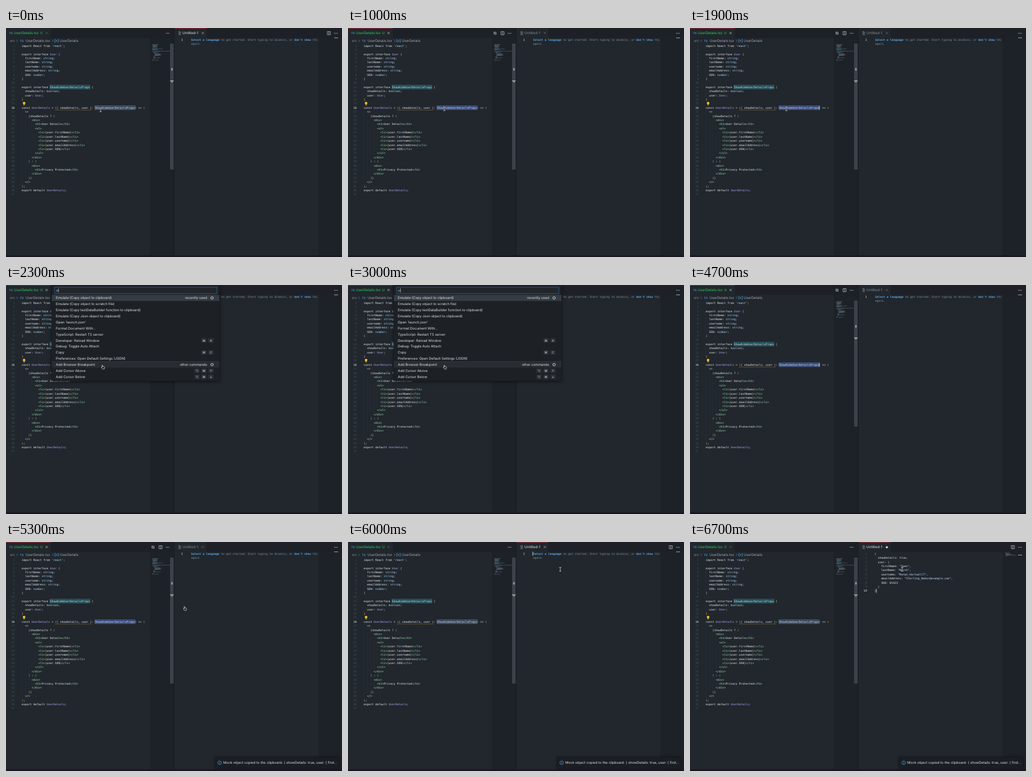
Recreate the animation shown at these times as an HTML page. Size 600 px wide and 411 px high, loop 6.8 s.

```html
<!DOCTYPE html>
<html lang="en">
<head>
<meta charset="utf-8">
<title>Editor</title>
<style>
  html, body { margin: 0; width: 100%; height: 100%; overflow: hidden; background: #21272d; }
  svg { display: block; width: 600px; height: 411px; }
  text { white-space: pre; text-rendering: geometricPrecision; }
  .code { font: 4.94px "DejaVu Sans Mono", monospace; }
  .ui { font: 6.1px Inter, "DejaVu Sans", sans-serif; }
  .num { text-anchor: end; }
</style>
</head>
<body>
<svg id="stage" viewBox="0 0 600 411"></svg>
<script>
const LOOP = 6800;
const CW = 2.974, LH = 7.41;
const FOCUS_LEFT = 450, OPEN = 2000, CLOSE = 4700, TOAST = 4800, FOCUS_RIGHT = 5800, PASTE = 6500;
const C = {
  bg: '#21272d', dark: '#1d2127', strip: '#1d2228', text: '#e4e9ee', dim: '#8b929a',
  num: '#49515a', name: '#b8a4f2', type: '#a6d4f7', tag: '#a5ecbd', brace: '#e6c27a',
  str: '#c5dcf2', green: '#35cf5f', blue: '#4aa5e8', red: '#a02c36'
};
const stage = document.getElementById('stage');

function el(parent, tag, attrs = {}, text) {
  const e = document.createElementNS('http://www.w3.org/2000/svg', tag);
  for (const k in attrs) e.setAttribute(k, attrs[k]);
  if (text !== undefined) e.textContent = text;
  parent.appendChild(e);
  return e;
}
const group = (parent = stage) => el(parent, 'g');
const rect = (p, x, y, width, height, fill, more) => el(p, 'rect', { x, y, width, height, fill, ...more });
const line = (p, d, stroke, w = 0.7, more) => el(p, 'path', { d, stroke, 'stroke-width': w, fill: 'none', ...more });
// y is the middle of the row
const ui = (p, x, y, s, fill, more) => el(p, 'text', { class: 'ui', x, y: y + 2.2, fill, ...more }, s);
const show = (e, on) => { e.style.display = on ? '' : 'none'; };

// ---- code text ----
const TOKEN = /('[^']*'|"[^"]*")|(<\/?\w+>)|\b(string|number|boolean)\b|\b(UserDetails|User)\b(?! Details)|([{}()]+)|([^'"<{}()\w]+|\w+|.)/g;
const TONES = [C.str, C.tag, C.type, C.name, C.brace, C.text];

function codeLine(p, x, y, s) {
  const t = el(p, 'text', { class: 'code', x, y: y + 1.7 });
  for (const m of s.matchAll(TOKEN)) {
    const kind = m.slice(1).findIndex(v => v !== undefined);
    el(t, 'tspan', { fill: TONES[kind] }, m[0]);
  }
}

function lineNumbers(p, x, y, count, current) {
  for (let i = 1; i <= count; i++)
    el(p, 'text', { class: 'code num', x, y: y + (i - 1) * LH + 1.7, fill: i === current ? '#f4f6f8' : C.num,
      'font-weight': i === current ? 'bold' : 'normal' }, i);
}

function miniMap(p, lines, x, y) {
  lines.forEach((s, i) => {
    const pad = s.search(/\S/);
    if (pad >= 0) rect(p, x + pad * 0.44, y + i * 0.82, (s.length - pad) * 0.44, 0.45, '#8d99a5', { opacity: 0.75 });
  });
}

const source = `import React from 'react';

export interface User {
  firstName: string;
  lastName: string;
  username: string;
  emailAddress: string;
  SEN: number;
}

export interface ShowHideUserDetailsProps {
  showDetails: boolean;
  user: User;
}

const UserDetails = ({ showDetails, user }: ShowHideUserDetailsProps) => (
  <>
    {showDetails ? (
      <div>
        <h1>User Details</h1>
        <ul>
          <li>{user.firstName}</li>
          <li>{user.lastName}</li>
          <li>{user.username}</li>
          <li>{user.emailAddress}</li>
          <li>{user.SEN}</li>
        </ul>
      </div>
    ) : (
      <div>
        <h1>Privacy Protected</h1>
      </div>
    )}
  </>
);
export default UserDetails;
`.split('\n');

const pasted = `{
  showDetails: true,
  user: {
    firstName: "Owen",
    lastName: "Marsh",
    username: "Ronan_Hartwell7",
    emailAddress: "Sterling_Nabor@example.com",
    SEN: 65423
  }
}`.split('\n');

// ---- icons ----
function cross(p, x, y, color) {
  line(p, `M${x - 1.9} ${y - 1.9}l3.8 3.8m0 -3.8l-3.8 3.8`, color);
}
function dots(p, x, y) {
  for (let i = -1; i < 2; i++) el(p, 'circle', { cx: x + i * 2.4, cy: y, r: 0.65, fill: '#c9ced4' });
}
function split(p, x, y) {
  line(p, `M${x - 2.8} ${y - 2.8}h5.6v5.6h-5.6zM${x} ${y - 2.8}v5.6`, '#c9ced4');
}
function compare(p, x, y) {
  line(p, `M${x - 2} ${y - 2.5}v4h3m-1.2 -1.2l1.2 1.2l-1.2 1.2M${x + 2} ${y + 2.5}v-4h-3m1.2 -1.2l-1.2 1.2l1.2 1.2`, '#c9ced4');
}
function gear(p, x, y) {
  el(p, 'circle', { cx: x, cy: y, r: 2.5, fill: 'none', stroke: '#c4c9cf', 'stroke-width': 1, 'stroke-dasharray': '1.3 0.66' });
  el(p, 'circle', { cx: x, cy: y, r: 1.7, fill: 'none', stroke: '#c4c9cf', 'stroke-width': 0.6 });
}

// ---- left editor ----
const LX = 28, LY = 32;
const rowY = n => LY + (n - 1) * LH;
const left = group();
rect(left, 0, 0, 600, 411, C.bg);
rect(left, 80, 0, 220, 18, C.dark);
rect(left, 257, 18, 43, 390, C.strip);
ui(left, 5.5, 9, 'TS', C.blue, { style: 'font-size:4.8px;font-weight:600' });
ui(left, 14, 9, 'UserDetails.tsx', C.green, { style: 'font-size:6.2px' });
ui(left, 61, 9, 'U', C.green);
dots(left, 288.5, 9.5);

ui(left, 7, 23, 'src', C.dim);
ui(left, 35, 23, 'UserDetails.tsx', '#a3a9b0');
ui(left, 96, 23, 'UserDetails', '#a3a9b0');
ui(left, 25, 23, 'TS', C.blue, { style: 'font-size:4.8px;font-weight:600' });
line(left, 'M19 21.2l1.8 1.8l-1.8 1.8M82.5 21.2l1.8 1.8l-1.8 1.8', C.dim, 0.6);
line(left, 'M88.5 20.5h-1.5v5h1.5M92 20.5h1.5v5h-1.5', C.blue, 0.7);
el(left, 'circle', { cx: 90.2, cy: 23, r: 1.1, fill: 'none', stroke: C.blue, 'stroke-width': 0.7 });

const guides = [[0, 4, 8], [0, 12, 13], [0, 17, 34], [2, 18, 33], [4, 19, 28], [4, 30, 32], [6, 20, 27], [6, 31, 31], [8, 22, 26]];
for (const [col, a, b] of guides)
  line(left, `M${LX + col * CW + 0.3} ${rowY(a) - LH / 2}V${rowY(b) + LH / 2}`, '#2d343b', 0.5);

const propsW = 24 * CW;
const boxed = (p, col, row, fill, stroke) =>
  rect(p, LX + col * CW, rowY(row) - 3.6, propsW, 7.2, fill, { stroke, 'stroke-width': 0.6 });
boxed(left, 17, 11, '#1d4750', '#397784');
const selDim = group(left), selLit = group(left);
boxed(selDim, 44, 16, '#354459', '#5d7c91');
boxed(selLit, 44, 16, '#34477c', '#52709a');

source.forEach((s, i) => codeLine(left, LX, rowY(i + 1), s));
lineNumbers(left, 15.5, LY, 37, 16);
line(left, `M${LX + 20 * CW} 147.2H${LX + 42 * CW}`, '#b5823c', 0.7, { 'stroke-dasharray': '1.2 0.6' });
el(left, 'circle', { cx: 32.3, cy: 134.8, r: 2.3, fill: '#f3c62f' });
rect(left, 31.3, 137, 2, 1.8, '#d9ae2a');

miniMap(left, source, 261, 29);
rect(left, 261, 36.8, 9, 0.8, '#39798a');
rect(left, 266, 41, 9, 0.8, '#4a69a8');
const slider = group(left);
rect(slider, 293, 28, 6.5, 226, '#3c424a');
rect(left, 295, 72, 2.6, 4.4, '#8f9aa3');
rect(left, 293, 94.3, 6.5, 1.2, '#c3c8cd');
rect(left, 295.2, 95, 2.2, 3, '#9299a0');

const leftOn = group(left), leftOff = group(left);
rect(leftOn, 0, 0, 80, 0.9, C.red);
cross(leftOn, 72.5, 9, '#d5d9dd');
compare(leftOn, 262.5, 9.3);
split(leftOn, 276, 9.3);
cross(leftOff, 72.5, 9, '#5c636b');
const leftCaret = rect(left, LX + 68 * CW + 0.3, 139.6, 0.8, 7.2, '#f1f3f5');

// ---- right editor ----
const RX = 329.5, RY = 21;
const right = group();
rect(right, 358, 0, 242, 18, C.dark);
rect(right, 558, 18, 42, 390, C.strip);
rect(right, 299.8, 0, 1, 408, '#171b20');
line(right, 'M308 6.5h3.5M308 8.3h5M308 10.1h4M308 11.9h4.6', '#a9b0b7', 0.6);
dots(right, 589, 9.5);
const title = ui(right, 315, 9, 'Untitled-1', C.text, { style: 'font-size:6.3px' });
const rightOn = group(right);
rect(rightOn, 301, 0, 57, 0.9, C.red);
split(rightOn, 576.5, 9.3);
const closeMark = group(right);
cross(closeMark, 351.5, 9, '#b4bac0');

const hint = group(right);
lineNumbers(hint, 316, RY, 1, 1);
const hintText = el(hint, 'text', { class: 'code', x: 330.5, y: RY + 1.7, 'font-style': 'italic', fill: '#878f98' });
const link = { fill: '#5da9e9', 'font-weight': 'bold' };
el(hintText, 'tspan', link, 'Select a language');
el(hintText, 'tspan', {}, ' to get started. Start typing to dismiss, or ');
el(hintText, 'tspan', link, "don't show");
el(hintText, 'tspan', {}, ' thi');
el(hint, 'text', { class: 'code', x: 330.5, y: RY + LH + 1.7, 'font-style': 'italic', fill: '#878f98' }, 'again.');
rect(hint, 586, 17.2, 7, 1, '#aab0b6');

const result = group(right);
pasted.forEach((s, i) => codeLine(result, RX, RY + i * LH, s));
lineNumbers(result, 316, RY, pasted.length, 10);
miniMap(result, pasted, 562, 18.5);
rect(result, 586, 23, 7, 1, '#aab0b6');
el(result, 'circle', { cx: 351.5, cy: 9.3, r: 1.9, fill: '#d5d9dd' });
const rightCaret = rect(right, 0, 0, 0.8, 7.2, '#f1f3f5');

rect(stage, 0, 408, 600, 3, '#1d1523');

// ---- command palette ----
const palette = group();
rect(palette, 82, -2, 299, 174, '#1d2126', { rx: 1.5, style: 'filter:drop-shadow(0 1px 3px rgba(0,0,0,.6))' });
rect(palette, 86.8, 4, 290, 11.4, '#21262c', { stroke: '#2f6fae', 'stroke-width': 0.7 });
ui(palette, 89, 9.8, '>', '#e3e7eb');
const inputCaret = rect(palette, 93.4, 6.3, 0.7, 7, '#e3e7eb');
const commands = [
  ['Emulate (Copy object to clipboard)', '', 'recently used'],
  ['Emulate (Copy object to scratch file)'],
  ['Emulate (Copy testDataBuilder function to clipboard)'],
  ['Emulate (Copy Json object to clipboard)'],
  ["Open 'launch.json'"],
  ['Format Document With...'],
  ['TypeScript: Restart TS server'],
  ['Developer: Reload Window', '⌘R'],
  ['Debug: Toggle Auto Attach'],
  ['Copy', '⌘C'],
  ['Preferences: Open Default Settings (JSON)'],
  ['Add Browser Breakpoint', '', 'other commands'],
  ['Add Cursor Above', '⌥⌘↑'],
  ['Add Cursor Below', '⌥⌘↓']
];
commands.forEach(([label, keys = '', note], i) => {
  const y = 23.2 + i * 10.88;
  if (note) {
    rect(palette, 82, y - 5.4, 299, 10.8, i ? '#282d33' : '#363c44');
    if (i) line(palette, `M82 ${y - 5.5}H381`, '#3b424a', 0.6);
    ui(palette, 359, y, note, '#dfe3e7', { 'text-anchor': 'end' });
    gear(palette, 368, y);
  }
  ui(palette, 89, y, label, '#e3e7eb');
  [...keys].forEach((k, j) => {
    const x = 366 - (keys.length - 1 - j) * 12.5;
    rect(palette, x - 4.8, y - 4, 9.6, 8, '#2b3036', { rx: 1.3 });
    ui(palette, x, y, k, '#d5dade', { 'text-anchor': 'middle', style: 'font-size:5.4px' });
  });
});

// ---- notification ----
const toast = group();
rect(toast, 373, 386.3, 222, 20, '#1a1e23', { style: 'filter:drop-shadow(0 0 2px rgba(0,0,0,.6))' });
el(toast, 'circle', { cx: 381.5, cy: 396.2, r: 3.2, fill: 'none', stroke: '#4aa0e8', 'stroke-width': 0.8 });
line(toast, 'M381.5 394.2v0.9M381.5 395.8v2.3', '#4aa0e8', 0.8);
ui(toast, 388, 396.2, 'Mock object copied to the clipboard: { showDetails: true, user: { first...', '#dfe3e7', { style: 'font-size:6.15px' });

// ---- mouse ----
const mouse = group();
const beam = group(mouse), hand = group(mouse);
const beamPath = 'M-1.8 -3.6Q0 -3.6 0 -2.6Q0 -3.6 1.8 -3.6M0 -2.8V2.8M-1.8 3.6Q0 3.6 0 2.6Q0 3.6 1.8 3.6';
line(beam, beamPath, '#14181c', 1.9);
line(beam, beamPath, '#f2f4f6', 0.8);
el(hand, 'path', {
  d: 'M-1.6 -3.2q.7 -.7 1.3 0l.4 2l2.1 .5q.8 .3 .7 1.2l-.5 2.8h-3l-2 -2.5q-.3 -.9 .7 -.8l.8 .5z',
  fill: '#15181b', stroke: '#f2f4f6', 'stroke-width': 0.75
});

const path = [[0, 169, 147], [300, 169, 147], [600, 172, 145], [2000, 172, 145], [2300, 173, 147.5],
  [4850, 173, 147.5], [5250, 319.5, 119.5], [5400, 319.5, 119.5], [5800, 379, 49], [LOOP, 379, 49]];

function mouseAt(t) {
  const i = Math.max(1, path.findIndex(k => k[0] > t));
  const [a, b] = [path[i - 1], path[i]];
  const u = (t - a[0]) / (b[0] - a[0]);
  const e = u * u * (3 - 2 * u);
  return [a[1] + (b[1] - a[1]) * e, a[2] + (b[2] - a[2]) * e];
}

const blink = age => age >= 0 && age % 1000 < 500;

function render(t) {
  const open = t >= OPEN && t < CLOSE;
  const onLeft = t >= FOCUS_LEFT && t < FOCUS_RIGHT;
  const done = t >= PASTE;
  show(leftOn, onLeft);
  show(leftOff, !onLeft);
  show(selLit, onLeft);
  show(selDim, !onLeft);
  show(rightOn, !onLeft);
  title.setAttribute('fill', onLeft ? '#858c94' : C.text);
  closeMark.setAttribute('opacity', onLeft ? 0.5 : 1);
  show(closeMark, !done);
  show(hint, !done);
  show(result, done);
  show(slider, !open);
  show(palette, open);
  show(toast, t >= TOAST);

  show(leftCaret, onLeft && !open && blink(t - (t < OPEN ? FOCUS_LEFT : CLOSE)));
  show(inputCaret, blink(t - OPEN));
  show(rightCaret, t >= FOCUS_RIGHT && blink(t - (done ? PASTE : FOCUS_RIGHT)));
  rightCaret.setAttribute('x', RX + (done ? CW : 0));
  rightCaret.setAttribute('y', RY - 3.6 + (done ? 9 * LH : 0));

  const [x, y] = mouseAt(t);
  mouse.setAttribute('transform', `translate(${x} ${y})`);
  show(mouse, t < 3700 || t >= 4850);
  const pointing = t >= OPEN && t < 5500;
  show(hand, pointing);
  show(beam, !pointing);
}

const start = performance.now();
function tick() {
  render((performance.now() - start) % LOOP);
  requestAnimationFrame(tick);
}
tick();
</script>
</body>
</html>
```
